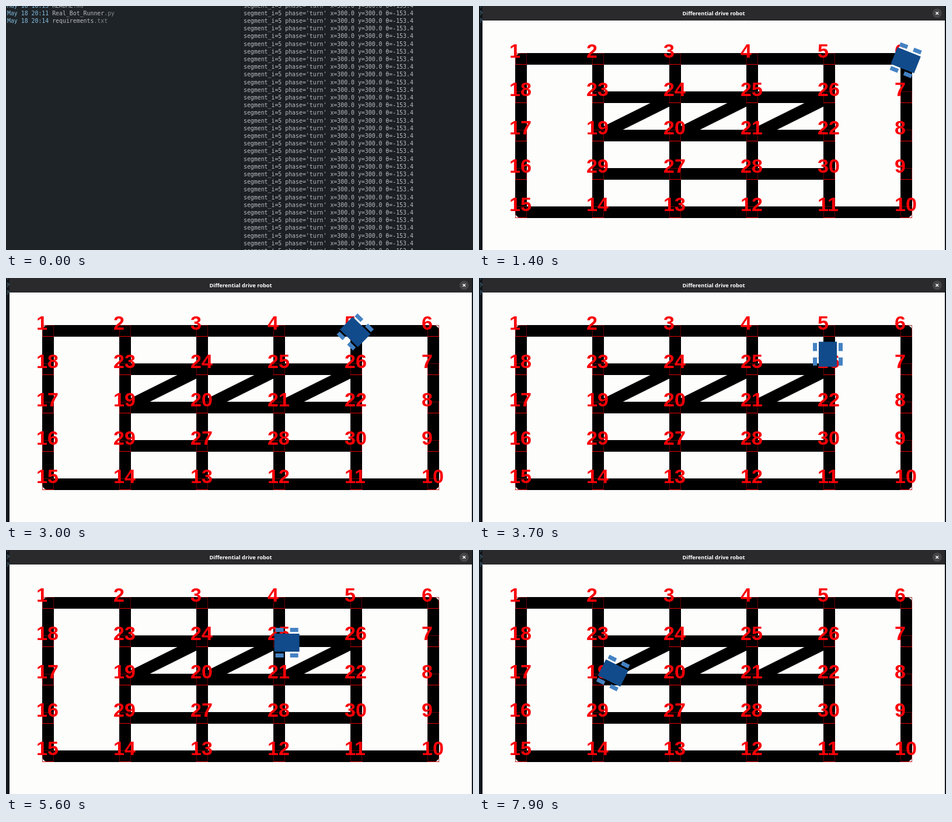
Animation, 800 px wide and 420 px high, one loop 8 s. Source, as an HTML page:

```html
<!DOCTYPE html>
<html lang="en">
<head>
<meta charset="utf-8">
<title>Differential drive robot</title>
<style>
html, body { margin: 0; width: 100%; height: 100%; overflow: hidden; background: #1e2327; }
svg { display: block; width: 800px; height: 420px; }
text { white-space: pre; }
#term { font: 9.87px "DejaVu Sans Mono", "Noto Sans Mono", monospace; fill: #b8bbbd; }
#term .date { fill: #85bfe2; }
#term .ext { fill: #858a8d; }
#title { font: 700 9.27px "Open Sans", "Noto Sans", sans-serif; fill: #fff; text-anchor: middle; }
#labels { font: 700 34px "Liberation Sans", Arial, sans-serif; fill: #fa0008; }
#track { fill: none; stroke: #000; stroke-width: 20; stroke-linejoin: round; }
</style>
</head>
<body>
<svg viewBox="0 0 800 420">
  <rect width="800" height="420" fill="#1e2327"/>
  <rect x="404" width="396" height="420" fill="#1d2126"/>
  <rect x="403" width="1" height="420" fill="#14181b"/>
  <g id="term"></g>
  <g id="win">
    <rect y="-20" width="805" height="470" rx="10" fill="#050b12" opacity=".5"/>
    <rect x="6" y="-12" width="792" height="444" rx="8" fill="#2a2a2d"/>
    <rect x="6" y="25" width="792" height="407" fill="#fdfdfc"/>
    <text id="title" x="402" y="16">Differential drive robot</text>
    <circle cx="784.8" cy="12.5" r="8" fill="#454548"/>
    <path d="M782.5 10.2l4.6 4.6m0-4.6l-4.6 4.6" stroke="#fff" stroke-width="1.4"/>
    <path id="track"/>
    <g id="boxes" fill="none"></g>
    <g id="labels"></g>
    <g id="robot">
      <rect x="-21.5" y="-18" width="43" height="31" fill="#114b8b"/>
      <path d="M-19.5-24.5h14m11 0h14M-19.5 19.5h14m11 0h14" stroke="#4482c3" stroke-width="7"/>
    </g>
  </g>
</svg>
<script>
const $ = id => document.getElementById(id);

// Terminal
const row = i => 15.7 + i * 13.2;
const fileLine = (time, name, ext, i) =>
  `<text x="2" y="${row(i)}"><tspan class="date">May 18 ${time}</tspan> ${name}<tspan class="ext">${ext}</tspan></text>`;
let term = fileLine("18:13", "README", ".md", -1) +
  fileLine("20:11", "Real_Bot_Runner", ".py", 0) +
  fileLine("20:14", "requirements", ".txt", 1);
for (let i = -1; i < 32; i++)
  term += `<text x="407" y="${row(i)}">segment_i=5 phase='turn' x=300.0 y=300.0 θ=-153.4</text>`;
$("term").innerHTML = term;

// Nodes: 1 to 18 clockwise round the edge, the rest in rows inside
const COLS = 5, ROWS = 4, nodes = [];
const put = (n, c, r) => nodes[n] = { x: 72 + c * 132, y: 91 + r * 66 };
for (let c = 0; c <= COLS; c++) {
  put(1 + c, c, 0);
  put(15 - c, c, ROWS);
}
for (let r = 1; r < ROWS; r++) {
  put(6 + r, COLS, r);
  put(19 - r, 0, r);
}
for (let c = 1; c < COLS; c++) {
  put(22 + c, c, 1);
  put(18 + c, c, 2);
}
[29, 27, 28, 30].forEach((n, i) => put(n, i + 1, 3));

const path = (...ids) => "M" + ids.map(n => `${nodes[n].x} ${nodes[n].y}`).join("L");
let track = path(1, 6, 10, 15) + "Z" + path(23, 26) + path(19, 22) + path(29, 30);
for (let i = 0; i < 4; i++) track += path(2 + i, 14 - i);
for (let i = 0; i < 3; i++) track += path(19 + i, 24 + i);
$("track").setAttribute("d", track);

let boxes = "", labels = "";
nodes.forEach(({ x, y }, n) => {
  boxes += `<path d="M${x - 9.5} ${y + 9.5}v-19h19v19" stroke="#860004" stroke-width=".8"/>` +
    `<path d="M${x - 10} ${y + 9.5}h20" stroke="#e60008"/>`;
  labels += `<text x="${x - 20}" y="${y - 2.5}">${n}</text>`;
});
$("boxes").innerHTML = boxes;
$("labels").innerHTML = labels;

// At each node the robot turns on the spot, then drives to the next
const ROUTE = [6, 5, 26, 24, 19], TURN = .119, DRIVE = .1265, START = 70;

function pose(t) {
  let left = t - START, heading = 0;
  for (let i = 1; i < ROUTE.length; i++) {
    const a = nodes[ROUTE[i - 1]], b = nodes[ROUTE[i]];
    const dx = b.x - a.x, dy = b.y - a.y;
    const goal = Math.atan2(dy, dx) * 180 / Math.PI, turn = goal - heading;
    const turnTime = Math.abs(turn) / TURN, driveTime = Math.hypot(dx, dy) / DRIVE;
    if (left < turnTime) return { ...a, heading: heading + turn * left / turnTime };
    left -= turnTime;
    const p = left / driveTime;
    if (p < 1) return { x: a.x + dx * p, y: a.y + dy * p, heading: goal };
    left -= driveTime;
    heading = goal;
  }
}

function draw(now) {
  const t = Math.floor(now % 8000 / 100) * 100, win = $("win");
  win.style.display = t < 200 ? "none" : "";
  if (t >= 200) {
    // The window zooms open, then settles by a pixel
    const open = 1 - 2 ** ((180 - t) / 12), settle = Math.max(0, 1 - t / 1000);
    win.setAttribute("transform",
      `translate(${402 + settle} ${210 + settle}) scale(${.5 + open / 2}) translate(-402 -210)`);
    win.setAttribute("opacity", open);
    const { x, y, heading } = pose(t);
    $("robot").setAttribute("transform", `translate(${x} ${y}) rotate(${-heading})`);
  }
}

function loop() {
  draw(performance.now());
  requestAnimationFrame(loop);
}
loop();
</script>
</body>
</html>
```
